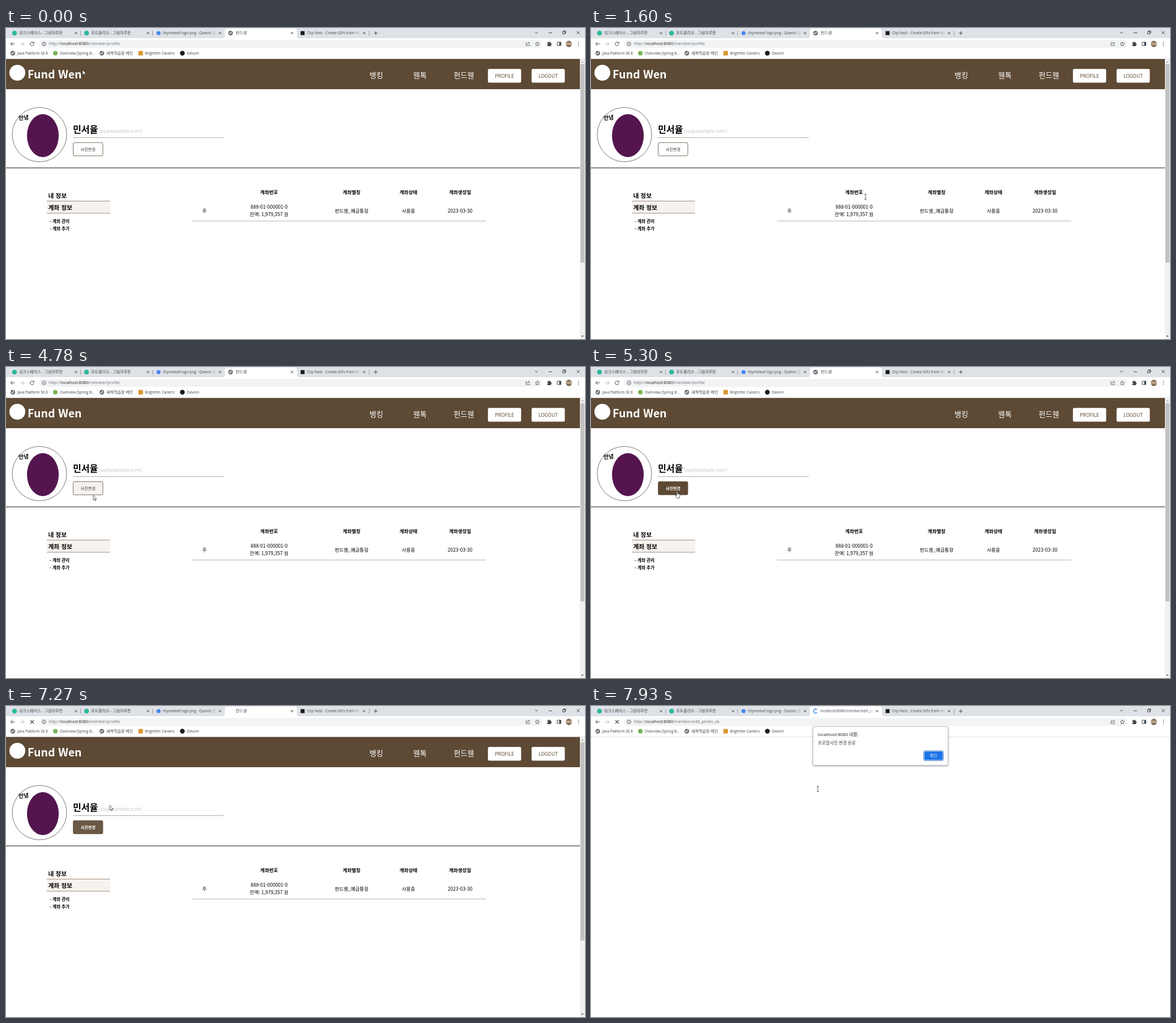
An HTML page for the animation above (8000 ms loop, 1021 by 549 pixels).

```html
<!DOCTYPE html>
<html lang="ko">
<head>
<meta charset="utf-8">
<title>Profile photo change</title>
<style>
html, body { margin: 0; width: 100%; height: 100%; overflow: hidden; background: #fff; }
svg { display: block; }
#stage { width: 100vw; height: 100vh; }
text { white-space: pre; }
.ui { font-family: "Open Sans", "Noto Sans CJK KR", "Noto Sans CJK JP", sans-serif; }
.web { font-family: "Noto Sans CJK KR", "Noto Sans CJK JP", "Noto Sans", sans-serif; }
.line { fill: none; stroke: #45484c; stroke-width: 1; }
</style>
</head>
<body>
<svg id="stage" viewBox="0 0 1021 549"></svg>
<script>
const LOOP = 8000, BROWN = '#5d4934';
const $ = id => document.getElementById(id);

// Markup helpers
const text = (x, y, size, str, attrs = '') =>
  `<text x="${x}" y="${y}" font-size="${size}" ${attrs}>${str}</text>`;
const mid = (x, y, size, str, attrs = '') => text(x, y, size, str, 'text-anchor="middle" ' + attrs);
const rect = (x, y, w, h, fill, attrs = '') =>
  `<rect x="${x}" y="${y}" width="${w}" height="${h}" fill="${fill}" ${attrs}/>`;
const dot = (x, y, r, fill, attrs = '') => `<circle cx="${x}" cy="${y}" r="${r}" fill="${fill}" ${attrs}/>`;
const line = (d, attrs = '') => `<path class="line" d="${d}" ${attrs}/>`;
const bold = 'font-weight="700"';

const globe = (x, y) => dot(x, y, 3.9, '#55595e') +
  `<path d="M${x - 2.6} ${y - 1.2}l2.2 .8 .6 1.4-1 1.6-1.2-1.2zM${x + .2} ${y - 2.8}l2.2 1-.6 1.8-1.8-1zM${x + 1} ${y + 1}l1.6-.4-1.2 2z" fill="#fff"/>`;

const tab = (x, icon, title, size, bg, id = '') => icon +
  `<svg x="${x}" y="0" width="94" height="18">${text(0, 11.4, size, title, `fill="#45484c" id="${id}"`)}
   ${rect(82, 0, 12, 18, `url(#${bg})`)}</svg>`;
const fade = (id, color) => `<linearGradient id="${id}"><stop stop-color="${color}" stop-opacity="0"/>
  <stop offset="1" stop-color="${color}"/></linearGradient>`;

const browser = `
  <defs>${fade('fadeTab', '#dee1e6')}${fade('fadeActive', '#fff')}
    <linearGradient id="photo" x2="0" y2="1"><stop stop-color="#6b5138"/><stop offset=".5" stop-color="#c9b299"/>
      <stop offset="1" stop-color="#54422f"/></linearGradient></defs>
  ${rect(0, 0, 1021, 18, '#dee1e6')}${rect(0, 18, 1021, 36, '#fff')}
  <path d="M382 18q4 0 4-4V5q0-4 4-4h119q4 0 4 4v9q0 4 4 4z" fill="#fff"/>
  ${tab(23, dot(15, 9, 4.3, '#2bb89b'), '워크스페이스 - 그림마루판', 7, 'fadeTab')}
  ${tab(150, dot(142, 9, 4.3, '#2bb89b'), '포트폴리오 - 그림마루판', 7, 'fadeTab')}
  ${tab(277, dot(269, 9, 3.6, '#4285f4'), 'thymeleaf logo png - Quevio 검색', 6.5, 'fadeTab')}
  ${tab(405, `<g id="tabIcon">${globe(396, 9)}</g>`, '펀드웬', 7, 'fadeActive', 'tabTitle')}
  ${tab(531, rect(519.5, 5.5, 7, 7, '#16191d'), 'Clip Nest - Create GIFs from Video', 6.5, 'fadeTab')}
  ${[123.5, 250.5, 377.5, 504.5, 631.5].map(x => line(`M${x - 2} 7l4 4m0-4l-4 4`)).join('')}
  ${[131.5, 258.5, 640.5].map(x => line(`M${x} 5v9`, 'style="stroke:#9a9da2"')).join('')}
  ${line('M652 5.8v6.4m-3.2-3.2h6.4M933 6.8l2.5 2.4 2.5-2.4M957 8.5h6M981.5 6.5h4v4h-4zM983 6.2v-1.2h4v4h-1.2M1006.5 5.5l5 5m0-5l-5 5')}
  ${rect(58, 21, 888, 14, '#f1f3f4', 'rx="7"')}
  ${line('M15.5 28h-7m3.2-3.3l-3.3 3.3 3.3 3.3')}
  ${line('M25 28h7m-3.2-3.3l3.3 3.3-3.3 3.3', 'style="stroke:#b4b7bb"')}
  <g id="reload">${line('M48.7 26.2a3.3 3.3 0 1 0 .4 2.6M49.2 24.4v2.4h-2.4')}</g>
  <g id="stop">${line('M43 25l6 6m0-6l-6 6', 'style="stroke-width:1.2"')}</g>
  ${dot(67, 28, 3.3, 'none', 'stroke="#55595e" stroke-width=".9"')}${line('M67 27.4v2.4M67 25.8v.8')}
  <text x="75.5" y="30.4" font-size="7.2" class="ui" fill="#6b6f74">http://<tspan fill="#202124">localhost:8080</tspan><tspan id="path"></tspan></text>
  ${line('M918.5 26h-1.5v5h6.5v-2M918.8 29q.5-3 4-3m-1.5-1.8l2 1.8-2 1.8M937 24.4l1.1 2.4 2.6.3-1.9 1.8.5 2.6-2.3-1.3-2.3 1.3.5-2.6-1.9-1.8 2.6-.3z', 'style="stroke-width:.8"')}
  <path d="M954.5 25.5h2q0-1.6 1.2-1.6t1.2 1.6h2.2v2.2q1.4 0 1.4 1.1t-1.4 1.1v2h-6.6v-2q1.3-.2 1.3-1.2t-1.3-1.2z" fill="#45484c"/>
  ${line('M972 25h6.5v6h-6.5z')}${rect(975.5, 25, 3, 6, '#45484c')}
  ${dot(992.5, 28, 5.5, 'url(#photo)')}
  ${[25, 28, 31].map(y => dot(1009.5, y, .8, '#45484c')).join('')}
  ${globe(12, 44.5)}${dot(87, 44.5, 4, '#7bb356')}${globe(169, 44.5)}
  ${rect(233.5, 40.5, 8, 8, '#d9952f')}${dot(311, 44.5, 4.2, '#1b1f23')}
  <g fill="#3c4043">
    ${text(20, 46.8, 6.4, 'Java Platform SE 8')}${text(95, 46.8, 6.4, 'Overview (Spring B...')}
    ${text(177, 47, 7, '새싹학습장 메인')}${text(245, 46.8, 6.4, 'Brightfen Careers')}${text(319, 46.8, 6.4, 'Devorn')}
  </g>
  ${rect(0, 54, 1021, .5, '#c4c7cb')}`;

const page = `
  ${rect(0, 54.5, 1012, 53.5, BROWN)}
  ${dot(20, 79, 14, '#fff')}
  <g fill="#fff">
    ${text(38, 89.3, 19.5, 'Fund Wen', bold)}
    ${[[653, '뱅킹'], [730, '웬톡'], [807.5, '펀드웬']].map(([x, s]) => mid(x, 88, 13, s, 'font-weight="500"')).join('')}
  </g>
  ${[[849.8, 'PROFILE'], [926.8, 'LOGOUT']].map(([x, s]) =>
    rect(x, 72.2, 58.6, 24.4, '#fff', 'rx="2.5"') + mid(x + 29.3, 88, 8.5, s, `fill="${BROWN}"`)).join('')}

  ${dot(59, 188.2, 48, '#fff', 'stroke="#55504c" stroke-width=".8"')}
  <ellipse cx="65" cy="190" rx="28" ry="38" fill="#54154f"/>
  ${mid(31, 162, 10, '안녕', 'font-weight="900" transform="rotate(-5 31 158)"')}
  ${text(118, 185.3, 16, '민서율', bold)}
  ${text(164, 184.8, 8.5, '(su@example.com)', 'fill="#c6c6c6"')}
  ${rect(118, 193, 266, .8, '#9b9691')}
  ${rect(118.5, 202.3, 52.3, 23.4, '#fff', `rx="2.5" stroke="${BROWN}" stroke-width=".8" id="button"`)}
  ${mid(144.7, 216.5, 7, '사진변경', 'id="buttonText"')}
  ${rect(0, 246.3, 1012, 1.3, '#55483b')}

  ${rect(72, 306, 111.5, 21, '#f6f2ee')}
  ${rect(72, 305.2, 111.5, .8, '#86705c')}${rect(72, 326.6, 111.5, .8, '#86705c')}
  ${text(74.5, 299.8, 10.7, '내 정보', bold)}${text(74.5, 320.9, 10.7, '계좌 정보', bold)}
  ${text(77, 343.8, 7.6, '- 계좌 관리', bold)}${text(77, 357, 7.6, '- 계좌 추가', bold)}

  ${[[464, '계좌번호'], [609.5, '계좌별칭'], [709.7, '계좌상태'], [800.7, '계좌생성일']]
    .map(([x, s]) => mid(x, 292.5, 8.5, s, bold)).join('')}
  ${[[350, 325.6, '주'], [464, 319.2, '888-01-000001-0'], [464, 331.8, '잔액: 1,979,357 원'],
     [609.5, 325.6, '펀드웬_예금통장'], [709.7, 325.6, '사용중'], [800.7, 325.6, '2023-03-30']]
    .map(([x, y, s]) => mid(x, y, 8.5, s)).join('')}
  ${rect(328, 340.4, 518.5, .8, '#a3a09d')}

  ${rect(1012, 54.5, 9, 494.5, '#f1f1f1')}${rect(1013, 64, 7, 350, '#c1c1c1')}
  <path d="M1014.3 61h4.4l-2.2-2.6z" fill="#a3a3a3"/><path d="M1014.3 543h4.4l-2.2 2.6z" fill="#505050"/>`;

const alertBox = `
  ${rect(391.5, 36.5, 238, 68, '#fff', 'rx="2" stroke="#c5c7ca" style="filter:drop-shadow(0 1px 1.5px #0006)"')}
  ${text(400, 53, 7.9, 'localhost:8080 내용:', 'fill="#202124"')}
  ${text(400, 68, 7.6, '프로필사진 변경 완료', 'fill="#3c4043"')}
  ${rect(586.5, 79, 35, 17.5, '#fff', 'rx="2.5" stroke="#4b7fc4" stroke-width="1"')}
  ${rect(587.8, 80.2, 32.4, 15, '#1a73e8', 'rx="1.5"')}
  ${mid(604, 90.2, 7, '확인', 'fill="#fff"')}`;

const cursors = `
  <g id="arrow"><path d="M0 0v8.6l2-1.8 1.4 3 1.3-.6-1.4-2.9h2.7z" fill="#fff" stroke="#222" stroke-width=".7"/></g>
  <g id="beam">${line('M-2 .5h1.6q.4 0 .4.5 0-.5.4-.5h1.6M0 1v8M-2 9.5h1.6q.4 0 .4-.5 0 .5.4.5h1.6', 'style="stroke-width:.9"')}</g>
  <g id="hand"><path d="M-.9 1q0-1 .9-1t.9 1v3.4l3 .6q1.2.3 1.1 1.5l-.5 3-.8 2.3h-4l-2.6-4.1q-.5-1 .4-1.1l1.6 1.2z" fill="#fff" stroke="#222" stroke-width=".7"/></g>`;

$('stage').innerHTML = `
  <g id="page" class="web" fill="#000">${page}</g>
  <g class="ui">${browser}</g>
  <path id="spinner" fill="none" stroke="#1a73e8" stroke-width="1.2"/>
  <g id="alert" class="ui">${alertBox}</g>
  <g id="cursor">${cursors}</g>`;

// Pointer moves: start, end, x, y, shape on arrival
const moves = [
  [0, 0, 135, 74, 'arrow'],
  [130, 340, 612, 345, 'arrow'],
  [1070, 1100, 617, 363, 'arrow'],
  [1330, 1600, 484, 293, 'beam'],
  [3020, 3090, 183, 247, 'arrow'],
  [4550, 4580, 158, 241, 'arrow'],
  [4750, 4800, 152, 219.5, 'hand'],
  [5540, 5760, 174, 186, 'arrow'],
  [6450, 6480, 177, 181, 'arrow'],
  [6680, 6780, 183, 175.5, 'arrow'],
  [7500, 7900, 400, 141.5, 'beam'],
];
const ramp = (t, a, b) => Math.max(0, Math.min(1, (t - a) / (b - a || 1)));
const ease = k => k * k * (3 - 2 * k);
const show = (id, on) => $(id).style.display = on ? '' : 'none';
const mix = (from, to, k) => `rgb(${from.map((v, i) => Math.round(v + (to[i] - v) * k))})`;

function moveCursor(t) {
  let [, , x, y, shape] = moves[0];
  for (const [start, end, toX, toY, next] of moves.slice(1)) {
    if (t < start) break;
    const k = ease(ramp(t, start, end));
    x += (toX - x) * k;
    y += (toY - y) * k;
    if (t >= end) shape = next;
  }
  $('cursor').setAttribute('transform', `translate(${x} ${y})`);
  for (const id of ['arrow', 'beam', 'hand']) show(id, id === shape);
}

function drawSpinner(t) {
  const k = ramp(t, 7340, 7930);
  const start = (-90 + 135 * k) * Math.PI / 180;
  const sweep = (8 + 262 * ease(k)) * Math.PI / 180;
  const at = a => `${396 + 3.6 * Math.cos(a)} ${9 + 3.6 * Math.sin(a)}`;
  $('spinner').setAttribute('d', `M${at(start)}A3.6 3.6 0 ${+(sweep > Math.PI)} 1 ${at(start + sweep)}`);
  $('spinner').setAttribute('opacity', .3 + .7 * ramp(t, 7340, 7450));
}

function render(t) {
  const loading = t >= 7240, left = t >= 7340;
  show('page', !left);
  show('tabIcon', !loading);
  show('spinner', loading);
  show('reload', !loading);
  show('stop', loading);
  show('alert', t >= 7440);
  $('tabTitle').textContent = left ? 'localhost:8080/member/edit_photo_ok' : '펀드웬';
  $('tabTitle').setAttribute('font-size', left ? 6.3 : 7);
  $('path').textContent = left ? '/member/edit_photo_ok' : '/member/profile';

  const hover = ramp(t, 4770, 4930) - ramp(t, 7240, 7600);
  $('button').setAttribute('fill', mix([255, 255, 255], [93, 73, 52], hover));
  $('buttonText').setAttribute('fill', mix([60, 50, 42], [255, 255, 255], ramp(t, 4770, 4930)));
  $('buttonText').setAttribute('font-weight', t >= 4800 ? 700 : 400);

  drawSpinner(t);
  moveCursor(t);
}

const begin = performance.now();
function tick() {
  render((performance.now() - begin) % LOOP);
  requestAnimationFrame(tick);
}
tick();
</script>
</body>
</html>
```
